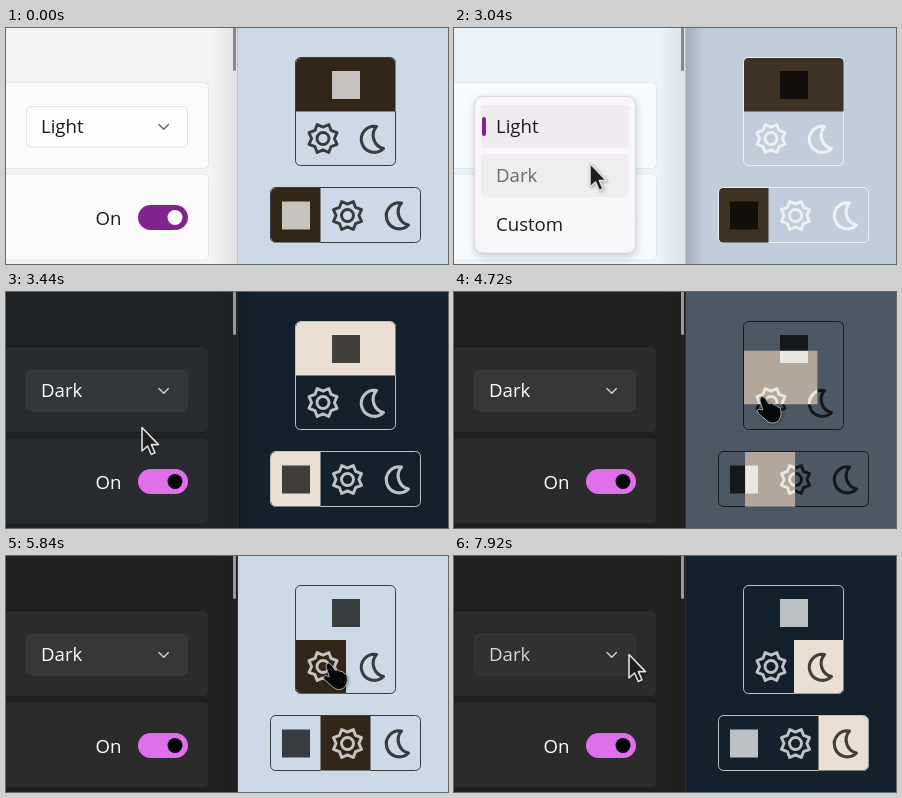
An HTML page for the animation above (8000 ms loop, 442 by 236 pixels).

```html
<!DOCTYPE html>
<html lang="en">
<head>
<meta charset="utf-8">
<title>Theme switcher</title>
<style>
  html, body { margin: 0; width: 100%; height: 100%; overflow: hidden; }
  svg { display: block; width: 442px; height: 236px; isolation: isolate; }
  text { font: 500 18.6px "Open Sans", "Noto Sans", sans-serif; }
  .marker { mix-blend-mode: difference; fill: #fff; }
  .line { fill: none; stroke-linejoin: round; stroke-linecap: round; }
  #cursor { filter: drop-shadow(1.5px 1.5px 1.5px rgba(0, 0, 0, .3)); }
</style>
</head>
<body>
<svg viewBox="0 0 442 236">
  <defs>
    <clipPath id="clipTop"><rect x="290" y="30" width="99.5" height="107.5" rx="4.5"/></clipPath>
    <clipPath id="clipRow"><rect x="265" y="160" width="149.5" height="54.5" rx="4.5"/></clipPath>
    <clipPath id="clipMenu"><rect id="reveal" x="0" width="210"/></clipPath>
    <linearGradient id="edge">
      <stop offset="0" stop-color="#000" stop-opacity=".16"/>
      <stop offset="1" stop-color="#000" stop-opacity="0"/>
    </linearGradient>
    <linearGradient id="lip">
      <stop offset="0" stop-color="#201018" stop-opacity="0"/>
      <stop offset="1" stop-color="#201018" stop-opacity=".08"/>
    </linearGradient>
    <filter id="soft" x="-20%" y="-20%" width="140%" height="140%"><feGaussianBlur stdDeviation="4"/></filter>
    <path id="star" class="line" stroke-width="2.9"/>
    <g id="sun"><use href="#star"/><circle class="line" r="6" stroke-width="2.9"/></g>
    <path id="moon" class="line" stroke-width="3.1" d="M5-12.5A13 13 0 1 0 12 9.5A13.5 13.5 0 0 1 5-12.5Z"/>
    <rect id="tile" x="-14" y="-14" width="28" height="28" stroke="none"/>
  </defs>

  <rect id="page" width="442" height="236"/>
  <rect id="shade" x="232" width="18" height="236" fill="url(#edge)"/>
  <g id="icons" opacity=".72">
    <rect class="line" x="289.5" y="29.5" width="100" height="108" rx="5"/>
    <rect class="line" x="264.5" y="159.5" width="150" height="55" rx="5"/>
    <use href="#tile" x="340" y="57"/>
    <use href="#sun" x="317" y="110.5"/>
    <use href="#moon" x="365.5" y="111"/>
    <use href="#tile" x="290" y="187.5"/>
    <use href="#sun" x="341.5" y="187.5"/>
    <use href="#moon" x="390.5" y="187.5"/>
  </g>
  <rect id="markTop" class="marker" clip-path="url(#clipTop)"/>
  <rect id="markRow" class="marker" clip-path="url(#clipRow)" y="160" width="50" height="55"/>

  <rect id="panel" width="232" height="236"/>
  <rect x="205" width="27" height="236" fill="url(#lip)"/>
  <rect id="rim" x="231" width="1" height="236"/>
  <rect id="thumb" x="227" y="-5" width="3" height="48" rx="1.5"/>
  <g id="cards">
    <rect x="-9.5" y="54.5" width="212" height="86" rx="5"/>
    <rect x="-9.5" y="146" width="212" height="86" rx="5"/>
  </g>
  <rect id="select" x="20.5" y="78.5" width="161" height="40.5" rx="4.5"/>
  <text id="value" x="35" y="105"></text>
  <path id="chevron" class="line" stroke-width="1.5" d="M153 96.5l4.7 4.7 4.7-4.7"/>
  <text id="on" x="89.5" y="197">On</text>
  <rect id="pill" x="132" y="177" width="50" height="25" rx="12.5"/>
  <circle id="knob" cx="169" cy="189.5" r="7.5"/>

  <g id="menu" clip-path="url(#clipMenu)">
    <rect x="21" y="71" width="161" height="157" rx="8" fill="#000" opacity=".2" filter="url(#soft)"/>
    <rect x="20.5" y="68.5" width="161" height="156.5" rx="8" fill="#f9f6fa" stroke="#d9d7da"/>
    <rect id="itemLight" x="27" y="77" width="148" height="43" rx="4" fill="#efebf0"/>
    <rect x="28" y="89" width="4" height="19" rx="2" fill="#82248f"/>
    <rect id="itemDark" x="27" y="126" width="148" height="43" rx="4" fill="#f0edf1"/>
    <text x="42" y="105" fill="#1b1b1b">Light</text>
    <text id="darkText" x="42" y="154">Dark</text>
    <text x="42" y="203" fill="#1b1b1b">Custom</text>
  </g>

  <g id="cursor" stroke-linejoin="round">
    <path id="arrow" fill="#1e1e1e" stroke="#dedede" stroke-width="1.6"
      d="M0 1.5V25L5.5 20L9.3 28.5L13 26.8L9.4 18.6H16.5Z"/>
    <path id="hand" fill="#080808" stroke="#aaa" stroke-width="1"
      d="M-2 1Q0-2 3 1L7 7Q10 5 12 8Q15 7 16 10Q19 10 19 14Q20 21 15 25Q9 28 4 23L-4 16Q-6 13-3 12L1 13L-2 4Z"/>
  </g>
</svg>
<script>
const LOOP = 8000;
const el = Object.fromEntries([...document.querySelectorAll('[id]')].map(n => [n.id, n]));
const set = (id, attrs) => { for (const k in attrs) el[id].setAttribute(k, attrs[k]); };
const ease = u => u * u * (3 - 2 * u);
const ramp = (t, start, length) => ease(Math.min(1, Math.max(0, (t - start) / length)));
const mix = (a, b, u) => a + (b - a) * u;
const rgb = (a, b, u) => `rgb(${a.map((v, i) => Math.round(mix(v, b[i], u)))})`;

const DAY = [205, 217, 230], NIGHT = [20, 33, 45];
const OPEN_MENU = 1800, PICK_DARK = 2980, SYSTEM_DARK = 3160, PICK_SUN = 4575, PICK_MOON = 6420;
const FADE = 400, SLIDE = 280;

// time, x, y of the pointer tip
const TRACK = [
  [960, 262, 240], [1280, 143, 108], [2060, 143, 108], [2560, 136, 134],
  [3840, 136, 134], [4300, 308, 105], [5680, 308, 105],
  [6110, 353, 113], [7200, 353, 113], [7880, 175, 97], [LOOP, 175, 97]
];

const THEMES = {
  light: { panel: '#f3f3f3', rim: '#bfc3c8', thumb: '#878787', card: '#fbfbfb', line: '#e6e6e6', select: '#fefefe',
    hover: '#f9f9f9', edge: '#e2e2e2', text: '#1b1b1b', dim: '#1b1b1b', mark: '#666', pill: '#80238e', knob: '#fff' },
  dark: { panel: '#202020', rim: '#2c3034', thumb: '#9a9a9a', card: '#2b2b2b', line: '#1e1e1e', select: '#373737',
    hover: '#303133', edge: '#3b3b3b', text: '#fff', dim: '#d6d6d6', mark: '#ccc', pill: '#e070ea', knob: '#000' }
};
// tints while the settings window has focus
const FOCUS = {
  light: { panel: '#eaf3f9', card: '#f7fafd', line: '#e0e7ed' },
  dark: { panel: '#1f2325', card: '#292c2e', line: '#1d2022', select: '#34373a' }
};

const points = Array.from({ length: 16 }, (_, i) => {
  const r = i % 2 ? 15.2 : 11.4, a = i * Math.PI / 8;
  return `${(r * Math.sin(a)).toFixed(2)} ${(-r * Math.cos(a)).toFixed(2)}`;
});
set('star', { d: `M${points.join('L')}Z` });

function pointerAt(t) {
  if (t < TRACK[0][0]) return [-60, -60];
  const i = TRACK.findIndex(k => k[0] > t);
  const [a, b] = [TRACK[i - 1], TRACK[i]];
  const u = ramp(t, a[0], b[0] - a[0]);
  return [mix(a[1], b[1], u), mix(a[2], b[2], u)];
}

function drawSwitcher(t) {
  const night = ramp(t, PICK_DARK, FADE) - ramp(t, PICK_SUN, FADE) + ramp(t, PICK_MOON, FADE);
  const pale = (t >= PICK_DARK && t < PICK_SUN) || t >= PICK_MOON;
  const ink = pale ? '#fff' : '#000';
  const sun = ramp(t, PICK_SUN, SLIDE), moon = ramp(t, PICK_MOON, SLIDE);
  set('page', { fill: rgb(DAY, NIGHT, night) });
  set('icons', { fill: ink, stroke: ink });
  set('markTop', { x: 290 + 50 * moon, y: 30 + 54 * sun, width: 100 - 50 * sun, height: 53.5 });
  set('markRow', { x: 264.5 + 50 * (sun + moon) });
}

function drawSettings(t, [x, y]) {
  const theme = t >= SYSTEM_DARK ? 'dark' : 'light';
  const focused = t >= OPEN_MENU && t < PICK_SUN;
  const c = { ...THEMES[theme], ...(focused && FOCUS[theme]) };
  const hot = x > 20 && x < 182 && y > 78 && y < 119;
  set('shade', { opacity: focused ? 1 : 0 });
  set('panel', { fill: c.panel });
  set('rim', { fill: c.rim });
  set('thumb', { fill: c.thumb });
  set('cards', { fill: c.card, stroke: c.line });
  set('select', { fill: hot ? c.hover : c.select, stroke: c.edge });
  set('value', { fill: hot ? c.dim : c.text });
  el.value.textContent = theme === 'dark' ? 'Dark' : 'Light';
  set('chevron', { stroke: c.mark });
  set('on', { fill: c.text });
  set('pill', { fill: c.pill });
  set('knob', { fill: c.knob });

  const open = ramp(t, OPEN_MENU, 220);
  set('menu', { opacity: t < OPEN_MENU ? 0 : 1 - ramp(t, 3060, 100) });
  set('reveal', { y: mix(78, 56, open), height: mix(42, 180, open) });
  set('itemDark', { opacity: y > 126 ? 1 : 0 });
  set('darkText', { fill: t >= 2720 ? '#6c6a6d' : '#1b1b1b' });
}

function drawPointer([x, y]) {
  const inTop = x > 290 && x < 390 && y > 30 && y < 138;
  set('cursor', { transform: `translate(${x.toFixed(2)} ${y.toFixed(2)})` });
  set('arrow', { opacity: inTop ? 0 : 1 });
  set('hand', { opacity: inTop ? 1 : 0 });
}

function draw(t) {
  const pointer = pointerAt(t);
  drawSwitcher(t);
  drawSettings(t, pointer);
  drawPointer(pointer);
}

const begin = performance.now();
function tick() {
  draw((performance.now() - begin) % LOOP);
  requestAnimationFrame(tick);
}
tick();
</script>
</body>
</html>
```
